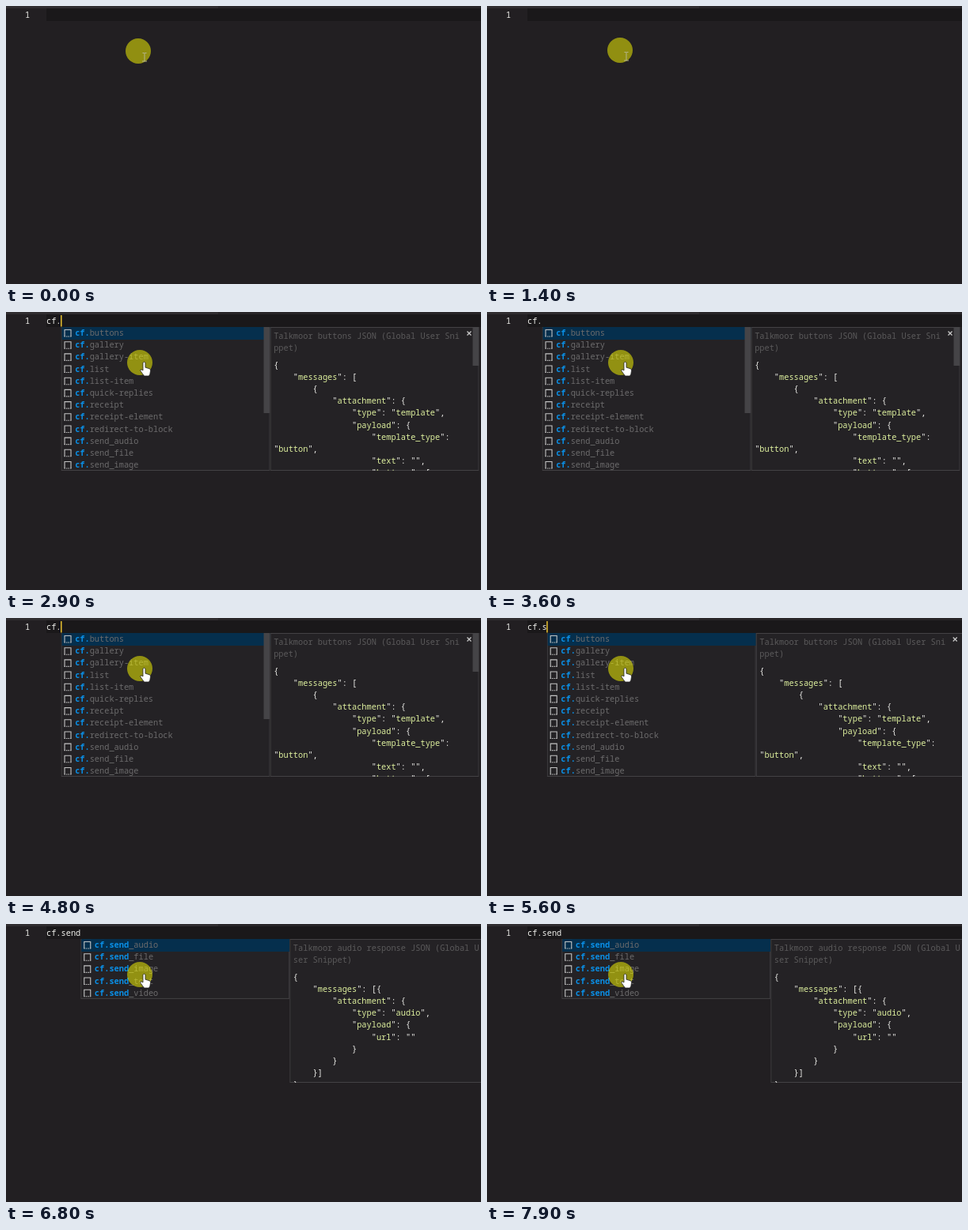
These frames come from a looping animation (600x352 px, 8000 ms). An HTML page:

```html
<!DOCTYPE html>
<html lang="en">
<head>
<meta charset="utf-8">
<title>Snippet completion</title>
<style>
  html, body { margin: 0; width: 100%; height: 100%; overflow: hidden; background: #221f22; }
  svg { display: block; }
  text { font: 500 10.3px "Noto Sans Mono", "DejaVu Sans Mono", monospace; white-space: pre; fill: #efefeb; }
  .dim { fill: #6c6b6c; }
  .head { fill: #5b5a5b; }
  .hit { fill: #0a8fe6; font-weight: 700; }
  .str { fill: #def09e; }
  .panel { fill: #242225; stroke: #434144; }
  .thumb { fill: #454447; }
  .icon { fill: none; stroke: #c4c4c4; stroke-width: 1.1; }
</style>
</head>
<body>
<svg width="600" height="352" viewBox="0 0 600 352">
  <rect width="600" height="352" fill="#221f22"/>
  <rect width="600" height="3" fill="#282528"/>
  <rect width="268" height="3" fill="#302d30"/>
  <rect x="51" y="3" width="549" height="16" fill="#1a181a"/>
  <text x="24" y="14.5">1</text>
  <text id="typed" x="51" y="14.5"></text>
  <g id="popup"></g>
  <rect id="caret" y="4" width="1.5" height="14.5" fill="#e8c130"/>
  <g id="pointer">
    <circle r="16" fill="#ff0" fill-opacity=".5"/>
    <path id="beam" d="M5.5 2.5h2l.5.5.5-.5h2M8 3v10M5 13h6" fill="none" stroke="#b4b48c"/>
    <path id="hand" d="M4 .2q1.5-2 3 0v6l5 1.5q1.8.7 1.6 2.5l-.8 4.5-1.3 2.3H5.5L.8 10.5q-.4-1.8 1.3-1.6L4 10z"
      fill="#fff" stroke="#222" stroke-width=".8"/>
  </g>
</svg>
<script>
const LOOP = 8000, CHAR = 6.18, ROW = 15.18, LEFT = 51, TOP = 19, WIDTH = 264, HEIGHT = 182;
const $ = id => document.getElementById(id);

const sends = ["audio", "file", "image", "text", "video"].map(kind => "send_" + kind);
const all = ["buttons", "gallery", "gallery-item", "list", "list-item", "quick-replies", "receipt",
  "receipt-element", "redirect-to-block", ...sends.slice(0, 3)];
const special = [...sends, "special-buttons"];

const buttonsDoc = {
  head: ["Talkmoor buttons JSON (Global User Sni", "ppet)"],
  code: `{
    "messages": [
        {
            "attachment": {
                "type": "template",
                "payload": {
                    "template_type":
"button",
                    "text": "",
                    "buttons": [`
};
const audioDoc = {
  head: ["Talkmoor audio response JSON (Global U", "ser Snippet)"],
  code: `{
    "messages": [{
        "attachment": {
            "type": "audio",
            "payload": {
                "url": ""
            }
        }
    }]
}`
};

const scenes = [
  { at: 0, typed: "", blink: -550 },
  { at: 1850, typed: "c" },
  { at: 2000, typed: "cf", match: "cf", items: all, doc: buttonsDoc, bars: true },
  { at: 2700, typed: "cf.", match: "cf.", items: all, doc: buttonsDoc, bars: true },
  { at: 5500, typed: "cf.s", match: "cf.", items: all, doc: buttonsDoc },
  { at: 5750, typed: "cf.se", match: "cf.se", items: special, doc: audioDoc },
  { at: 5900, typed: "cf.sen", match: "cf.sen", items: special, doc: audioDoc },
  { at: 6050, typed: "cf.send", match: "cf.send", items: special, doc: audioDoc },
  { at: 6200, typed: "cf.send", match: "cf.send", items: sends, doc: audioDoc, blink: 6050 }
];

// time, x, y
const path = [[0, 167, 57], [400, 167, 57], [800, 171, 60], [1250, 168, 56],
  [1400, 168, 56], [2000, 169, 64], [LOOP, 169, 64]];

const text = (x, y, body, cls = "") => `<text x="${x}" y="${y}" class="${cls}">${body}</text>`;
const span = (cls, body) => `<tspan class="${cls}">${body}</tspan>`;
const rect = (x, y, w, h, attrs) => `<rect x="${x}" y="${y}" width="${w}" height="${h}" ${attrs}/>`;

function highlight(name, match) {
  let next = 0;
  return [...name].map(ch => ch === match[next] ? (next++, span("hit", ch)) : ch).join("");
}

function listRow(name, i, match) {
  const y = i * ROW;
  return `<path class="icon" d="M4.5 ${y + 12}V${y + 3.5}h8V${y + 12}"/>`
    + `<path class="icon" stroke-dasharray="1.5 1" d="M4 ${y + 12}h9"/>`
    + text(17.6, y + 11.1, highlight("cf." + name, match), "dim");
}

function popup({ typed, items, match, doc, bars }) {
  if (!items) return "";
  const x = LEFT + typed.length * CHAR;
  const height = Math.min(items.length * ROW, HEIGHT);
  const code = doc.code.split("\n").map((line, i) =>
    text(4.6, 52 + i * 15.12, line.replace(/"(\w+)"/g, (_, word) => `"${span("str", word)}"`)));
  const list = rect(.5, .5, WIDTH - 1, height - 1, 'class="panel"')
    + rect(1, 0, WIDTH - 1, 16, 'fill="#052f4d"')
    + items.map((name, i) => listRow(name, i, match)).join("")
    + (bars ? rect(256, 0, 8, 109, 'class="thumb"') : "");
  const details = rect(.5, .5, WIDTH - 1, HEIGHT - 1, 'class="panel"')
    + doc.head.map((line, i) => text(4.6, 14.5 + i * ROW, line, "head")).join("")
    + code.join("")
    + (bars ? rect(256, 0, 8, 49, 'class="thumb"') : "")
    + '<path d="M249 5.5l5 5m0-5l-5 5" stroke="#c8c8c8" stroke-width="1.3"/>';
  return `<svg x="${x}" y="${TOP}" width="${WIDTH}" height="${height}">${list}</svg>`
    + `<svg x="${x + WIDTH}" y="${TOP}" width="${WIDTH}" height="${HEIGHT}">${details}</svg>`;
}

function pointerAt(t) {
  const i = path.findIndex(p => p[0] > t);
  const [t0, x0, y0] = path[i - 1], [t1, x1, y1] = path[i];
  const k = (t - t0) / (t1 - t0), ease = k * k * (3 - 2 * k);
  return [x0 + (x1 - x0) * ease, y0 + (y1 - y0) * ease];
}

let shown;
function draw() {
  const t = performance.now() % LOOP;
  const scene = scenes.findLast(s => s.at <= t);
  if (scene !== shown) {
    shown = scene;
    $("typed").textContent = scene.typed;
    $("popup").innerHTML = popup(scene);
    $("caret").setAttribute("x", LEFT + scene.typed.length * CHAR - .5);
    $("hand").style.display = scene.items ? "" : "none";
    $("beam").style.display = scene.items ? "none" : "";
  }
  const lit = (t - (scene.blink ?? scene.at)) % 1000 < 500;
  $("caret").style.visibility = lit ? "visible" : "hidden";
  $("pointer").setAttribute("transform", `translate(${pointerAt(t)})`);
  requestAnimationFrame(draw);
}
draw();
</script>
</body>
</html>
```
